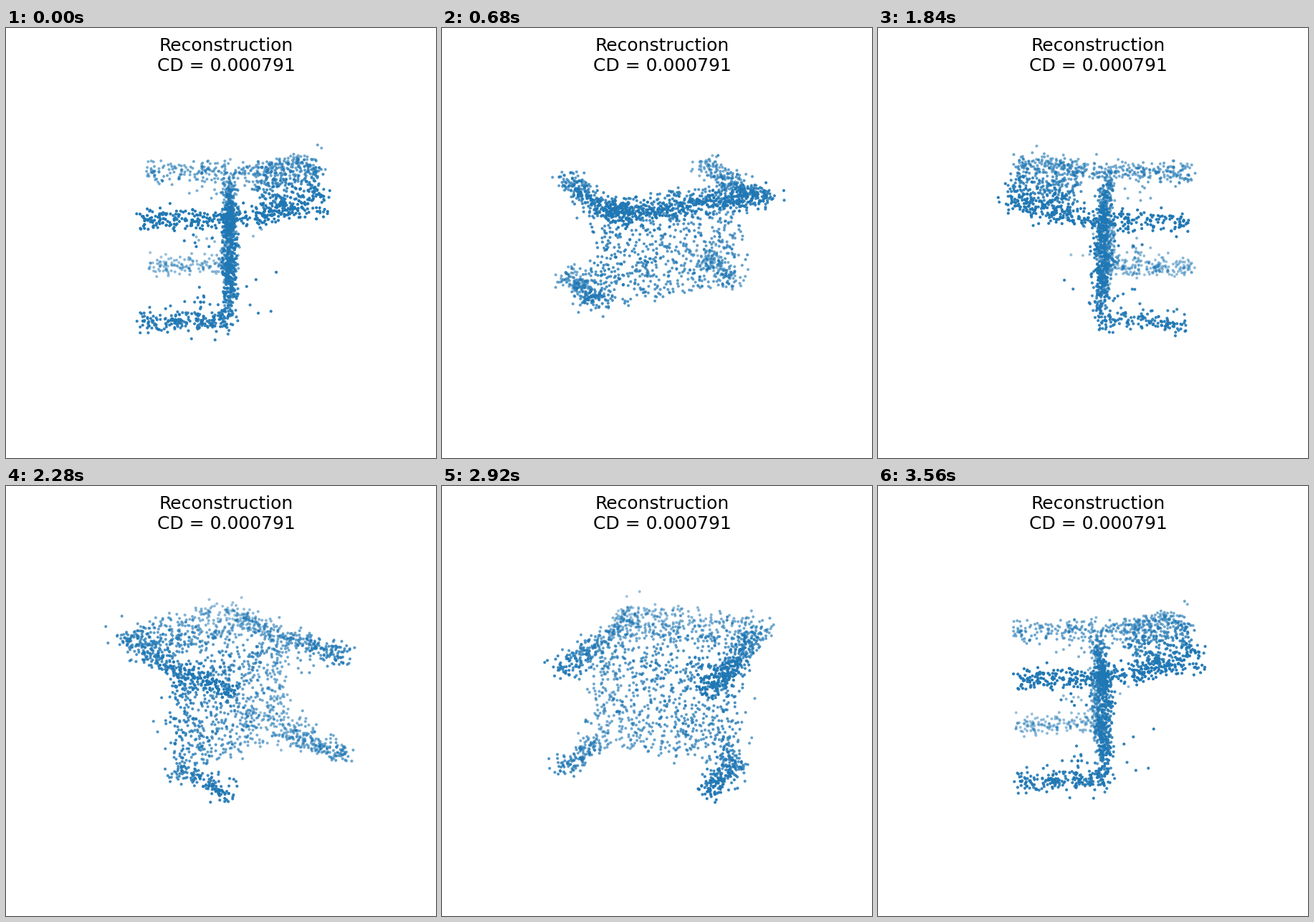
A matplotlib script that plays this animation: 600 by 600 pixels, repeating every 3600 ms.

```python
import numpy as np
import matplotlib.pyplot as plt
from matplotlib.animation import FuncAnimation
from matplotlib.colors import to_rgb

SIZE, DPI = 600, 100
FRAMES, INTERVAL = 90, 40
ELEV = np.radians(20)
DIST = 10
CENTER = (313.7, 296.8)
SCALE = 2497
BLUE = to_rgb("#1f77b4")

# Chair lying on its back: a = legs to backrest, b = width, z = height
HALF_WIDTH = 0.43
TOP, BOTTOM = 0.27, -0.308

rng = np.random.default_rng(7)


def cloud(n, a, b, z, noise):
    """Points spread evenly over a box, then blurred."""
    spans = [rng.uniform(lo, hi, n) for lo, hi in (a, b, z)]
    return np.column_stack(spans) + rng.normal(0, 1, (n, 3)) * noise


def leg(n, side, z):
    b = side * 0.42
    bar = cloud(n, (-0.49, 0), (b, b), (z, z), (0.012, 0.038, 0.028))
    inner = sorted((z * 0.4, z * 0.85))
    strays = cloud(n // 16, (-0.26, -0.03), (b, b), inner, (0, 0.04, 0))
    return np.vstack([bar, strays])


def back(n, a, b):
    """Backrest part, leaning slightly away from the seat."""
    pts = cloud(n, a, b, (0.26, 0.26), (0.018, 0.025, 0.027))
    pts[:, 2] += 0.17 * pts[:, 0]
    return pts


def make_chair():
    parts = [
        cloud(740, (-0.03, 0.015), (-HALF_WIDTH, HALF_WIDTH),
              (-0.335, 0.295), (0.016, 0.02, 0.016)),
        back(430, (0.14, 0.51), (-0.44, 0.44)),
    ]
    for side in (-1, 1):
        near = side < 0
        parts += [
            leg(170 if near else 135, side, TOP),
            leg(200 if near else 135, side, BOTTOM),
            back(105, (0, 0.4), sorted((side * 0.34, side * 0.44))),
            cloud(6 if near else 2, (0.08, 0.26), (side * 0.43,) * 2,
                  (-0.26, 0.03), (0, 0.02, 0)),
        ]
    return np.vstack(parts)


def project(pts, angle):
    """Screen positions and colours, farthest first."""
    a, b, z = pts.T
    c, s = np.cos(angle), np.sin(angle)
    right, away = a * c + b * s, b * c - a * s
    depth = DIST + away * np.cos(ELEV) - z * np.sin(ELEV)
    up = z * np.cos(ELEV) + away * np.sin(ELEV)
    xy = np.column_stack([CENTER[0] + SCALE * right / depth,
                          CENTER[1] - SCALE * up / depth])
    alpha = 1 - 0.7 * (depth - depth.min()) / np.ptp(depth)
    rgba = np.column_stack([np.tile(BLUE, (len(pts), 1)), alpha])
    order = np.argsort(-depth)
    return xy[order], rgba[order]


chair = make_chair()
fig = plt.figure(figsize=(SIZE / DPI, SIZE / DPI), dpi=DPI, facecolor="white")
ax = fig.add_axes([0, 0, 1, 1])
ax.set_xlim(0, SIZE)
ax.set_ylim(SIZE, 0)
ax.axis("off")
ax.text(307.5, 60, "Reconstruction\nCD = 0.000791", fontsize=18,
        family="DejaVu Sans", ha="center", va="baseline")
start, shades = project(chair, 0)
dots = ax.scatter(start[:, 0], start[:, 1], s=4, c=shades)


def update(i):
    xy, rgba = project(chair, 2 * np.pi * i / FRAMES)
    dots.set_offsets(xy)
    dots.set_facecolor(rgba)
    return dots,


anim = FuncAnimation(fig, update, frames=FRAMES, interval=INTERVAL,
                     repeat=True, repeat_delay=0)
plt.show()
```
